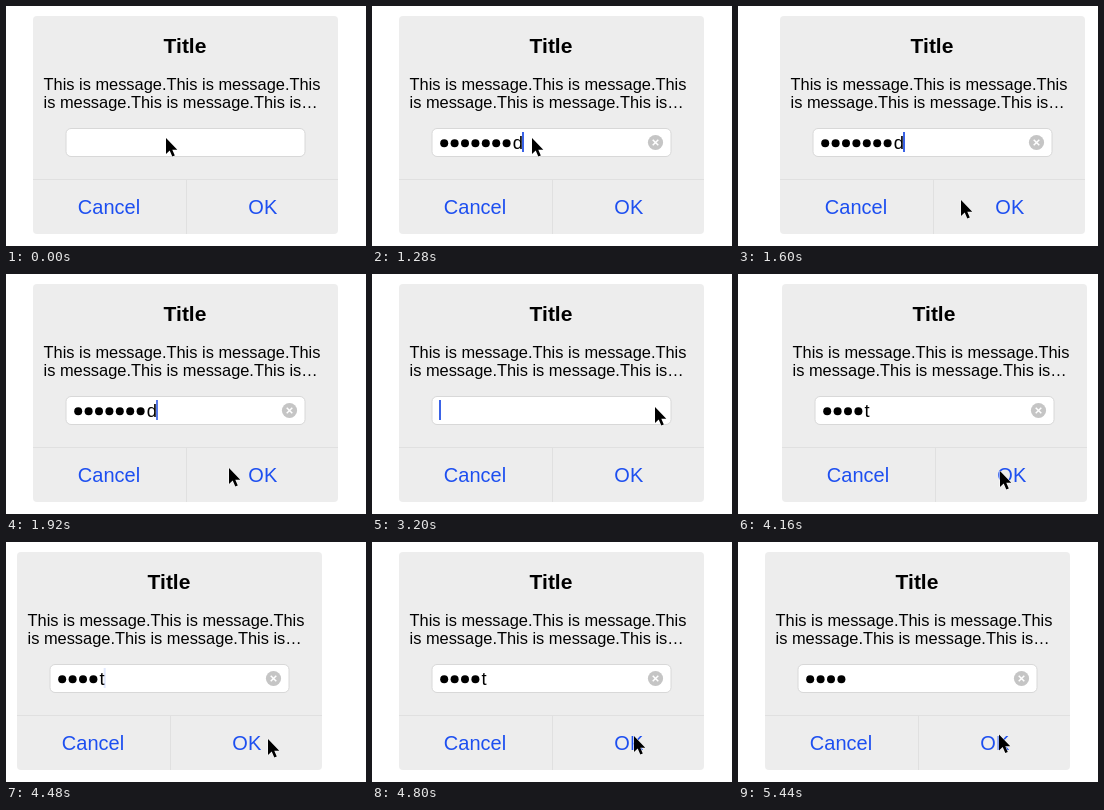
Recreate the animation shown at these times as an HTML page. Size 360 by 240 pixels, loop 5.76 s.

```html
<!DOCTYPE html>
<html lang="en">
<head>
<meta charset="utf-8">
<title>Password prompt</title>
<style>
  html, body { margin: 0; width: 100%; height: 100%; overflow: hidden; background: #fff; }
  svg { display: block; width: 360px; height: 240px; font-family: "Liberation Sans", Arial, sans-serif; }
  .button { font-size: 20px; fill: #1d4ff0; text-anchor: middle; }
  .title { font-size: 21px; font-weight: bold; text-anchor: middle; }
  .message { font-size: 16.4px; }
</style>
</head>
<body>
<svg viewBox="0 0 360 240">
  <g id="dialog">
    <rect x="27" y="10" width="305" height="218" rx="4" fill="#ededed"/>
    <path d="M27 173.5H332M180.5 173V228" stroke="#e0e0e0"/>
    <text class="title" x="179" y="47">Title</text>
    <g class="message">
      <text x="37.5" y="84">This is message.This is message.This</text>
      <text x="37.5" y="102">is message.This is message.This is…</text>
    </g>
    <rect x="60" y="122.5" width="239" height="28" rx="5" fill="#fff" stroke="#d8d8d8"/>
    <g id="dots"></g>
    <text id="letter" y="143" font-size="18.4"></text>
    <rect id="caret" y="126" width="2" height="20" fill="#3b63e6"/>
    <g id="clear">
      <circle cx="283.5" cy="136.5" r="7.6" fill="#c5c5c5"/>
      <path d="M280.7 133.7l5.6 5.6m0-5.6l-5.6 5.6" stroke="#fff" stroke-width="1.5"/>
    </g>
    <text class="button" x="103" y="208">Cancel</text>
    <text class="button" x="256.8" y="208">OK</text>
  </g>
  <path id="pointer" d="M0 0V16L3.7 12.6 6.3 18.6 8.8 17.5 6.3 11.7H11.3Z"
        stroke="#fff" stroke-linejoin="round" paint-order="stroke"/>
</svg>
<script>
const STEP = 320, LOOP = 5760, LEFT = 68, PITCH = 10.4;
const $ = id => document.getElementById(id);

// Each key holds until the next one; only changed properties are listed.
const keys = [
  { t: 0, dots: 0, letter: "", caret: 0, shift: 0, x: 160, y: 132 },
  { t: 640, caret: 1 },
  { t: 960, dots: 3, letter: "f" },
  { t: 1280, dots: 7, letter: "d" },
  { t: 1600, shift: 15, x: 223, y: 194 },
  { t: 1920, shift: 0, caret: 0.85 },
  { t: 2240, caret: 0 },
  { t: 2880, caret: 1, x: 258, y: 192 },
  { t: 3200, dots: 0, letter: "", x: 283, y: 133 },
  { t: 3520, dots: 1, letter: "e" },
  { t: 3840, dots: 4, letter: "t" },
  { t: 4160, shift: 17, caret: 0, x: 262, y: 197 },
  { t: 4480, shift: -16, caret: 0.15 },
  { t: 4800, shift: 0, caret: 0, y: 194 },
  { t: 5120, letter: "", caret: 1 },
  { t: 5440, caret: 0, x: 261, y: 192.5 }
];

for (let i = 0; i < 7; i++) {
  $("dots").innerHTML += `<circle cx="${LEFT + 4.2 + i * PITCH}" cy="137.3" r="4"/>`;
}

const letterWidth = { "": 0, d: 10.2, e: 10.2, f: 5.1, t: 5.1 };

function render(time) {
  const s = Object.assign({}, ...keys.filter(k => k.t <= time));
  const end = LEFT + s.dots * PITCH;
  $("dialog").setAttribute("transform", `translate(${s.shift})`);
  $("pointer").setAttribute("transform", `translate(${s.x} ${s.y})`);
  [...$("dots").children].forEach((dot, i) => dot.setAttribute("opacity", i < s.dots ? 1 : 0));
  $("letter").textContent = s.letter;
  $("letter").setAttribute("x", end);
  $("caret").setAttribute("x", end + letterWidth[s.letter] - 1);
  $("caret").setAttribute("opacity", s.caret);
  $("clear").setAttribute("opacity", s.dots ? 1 : 0);
}

const start = performance.now();
function tick() {
  const time = (performance.now() - start) % LOOP;
  render(Math.floor(time / STEP) * STEP);
  requestAnimationFrame(tick);
}
tick();
</script>
</body>
</html>
```
